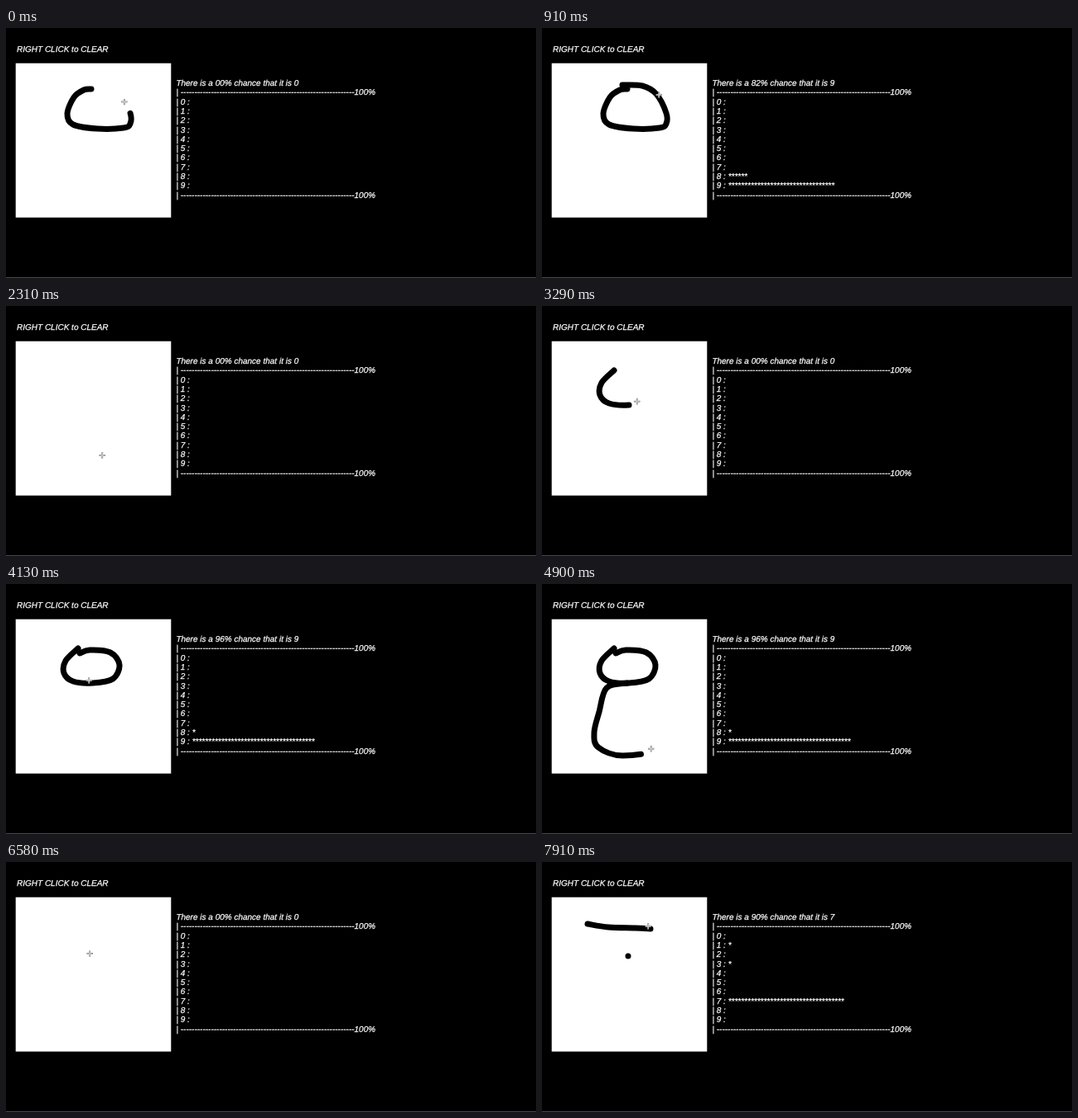
Write an HTML page that moves like this. It is 640x303 px and loops after 8000 ms.

```html
<!DOCTYPE html>
<html lang="en">
<head>
<meta charset="utf-8">
<title>Digit guesser</title>
<style>
  html, body { margin: 0; width: 100%; height: 100%; overflow: hidden; background: #000; }
  svg { display: block; width: 100%; height: 100%; }
  text {
    font: italic 10px "Liberation Sans", Arial, sans-serif;
    font-kerning: none;
    text-rendering: geometricPrecision;
    fill: #fff;
    stroke: #fff;
    stroke-width: 0.25px;
    white-space: pre;
  }
</style>
</head>
<body>
<svg viewBox="0 0 640 303" xmlns="http://www.w3.org/2000/svg">
  <rect width="640" height="303" fill="#000"/>
  <rect y="302" width="640" height="1" fill="#007800"/>
  <text x="13" y="28.5">RIGHT CLICK to CLEAR</text>
  <rect x="11.7" y="42.7" width="187.6" height="187" fill="#fff"/>
  <g id="ink" fill="none" stroke="#000" stroke-width="7" stroke-linecap="round" stroke-linejoin="round"></g>
  <g id="cursor" fill="none">
    <path d="M-3.7 0H3.7M0 -3.7V3.7" stroke="#888" stroke-width="2"/>
    <path d="M-3 0H3M0 -3V3" stroke="#eee" stroke-width="0.7"/>
  </g>
  <g id="panel"></g>
</svg>
<script>
const LOOP = 8000, STEP = 70;
const $ = id => document.getElementById(id);

function add(parent, tag, attrs) {
  const el = document.createElementNS('http://www.w3.org/2000/svg', tag);
  for (const name in attrs) el.setAttribute(name, attrs[name]);
  return parent.appendChild(el);
}

// Smooth curve through the given points
function spline(pts) {
  const at = i => pts[Math.max(0, Math.min(pts.length - 1, i))];
  const handle = (i, dir) => at(i).map((v, k) => v + dir * (at(i + 1)[k] - at(i - 1)[k]) / 6);
  return 'M' + pts[0] + pts.slice(1)
    .map((p, i) => `C${handle(i, 1)} ${handle(i + 1, -1)} ${p}`).join('');
}

// The mouse track: strokes, and free moves that start where the last part ended
const track = [];

function part(start, end, pen, pts) {
  const path = add($('ink'), 'path', { d: spline(pts), display: 'none' });
  track.push({ start, end, pen, path, length: path.getTotalLength(), last: pts[pts.length - 1] });
}
const draw = (start, end, pts) =>
  part(start, end, true, pts.split(' ').map(p => p.split(',').map(Number)));
const move = (start, end, x, y) =>
  part(start, end, false, [track[track.length - 1].last, [x, y]]);

draw(-870, 420, '103,74 94,75 82,84 74,104 81,117 110,122 142,121 150,116 150,103 138,80 121,70 97,69');
move(490, 840, 144, 84);
draw(980, 1610, '144,84 140,150 135,214');
move(1890, 2240, 119, 184);
move(2450, 2870, 87, 78);
draw(2870, 3850, '87,78 72,93 70,108 81,118 105,120 129,115 137,98 126,83 101,80 89,84');
move(3920, 4130, 103, 122);
draw(4200, 5600, '103,120 78,126 69,155 63,180 68,198 98,208 146,197 160,157 146,122 128,114 103,114');
move(6090, 6510, 104, 115);
draw(6650, 6650, '104,114 104,114.1');
move(6650, 7000, 55, 75);
draw(7000, 7700, '55,75 80,79 112,80 131,81');

// A guess of zero percent also clears the board
const guesses = [
  { at: -LOOP, percent: 0, digit: 0, others: [] },
  { at: 490, percent: 82, digit: 9, others: [8] },
  { at: 1680, percent: 93, digit: 9, others: [8] },
  { at: 2310, percent: 0, digit: 0, others: [] },
  { at: 3920, percent: 96, digit: 9, others: [8] },
  { at: 5810, percent: 96, digit: 8, others: [9] },
  { at: 6580, percent: 0, digit: 0, others: [] },
  { at: 7910, percent: 90, digit: 7, others: [1, 3] }
];

const lines = Array.from({ length: 13 }, (_, i) =>
  add($('panel'), 'text', { x: 205.4, y: 70 + i * 11.3 }));

const latest = (list, test) => list.filter(test).pop();

// Distance travelled along a part, at constant speed
const travelled = ({ start, end, length }, t) =>
  t >= end ? length : length * (t - start) / (end - start);

// Forty stars make 100%; the runners-up share what is left
function starCount(n, { percent, digit, others }) {
  const main = Math.round(percent * 0.4);
  if (n === digit) return main;
  return others.includes(n) ? Math.floor((39 - main) / others.length) : 0;
}

function render(t) {
  const guess = latest(guesses, g => g.at <= t);
  const cleared = latest(guesses, g => g.at <= t && !g.percent).at;

  for (const p of track) {
    const shown = p.pen && p.start >= cleared && p.start <= t;
    p.path.setAttribute('display', shown ? 'inline' : 'none');
    if (shown) p.path.setAttribute('stroke-dasharray', `${travelled(p, t) + 0.01} 999`);
  }

  // Ink trails the pointer by one step
  const ahead = t + STEP;
  const current = latest(track, p => p.start <= ahead);
  const { x, y } = current.path.getPointAtLength(travelled(current, ahead));
  $('cursor').setAttribute('transform', `translate(${x - 2.8} ${y - 3})`);

  const percent = String(guess.percent).padStart(2, '0');
  const rule = '| ' + '-'.repeat(63) + '100%';
  const rows = Array.from({ length: 10 }, (_, n) => `| ${n} : ` + '*'.repeat(starCount(n, guess)));
  [`There is a ${percent}% chance that it is ${guess.digit}`, rule, ...rows, rule].forEach((s, i) => {
    if (lines[i].textContent !== s) lines[i].textContent = s;
  });
}

const origin = performance.now();
function tick() {
  const t = (performance.now() - origin) % LOOP;
  render(Math.floor(t / STEP) * STEP);
  requestAnimationFrame(tick);
}
tick();
</script>
</body>
</html>
```
